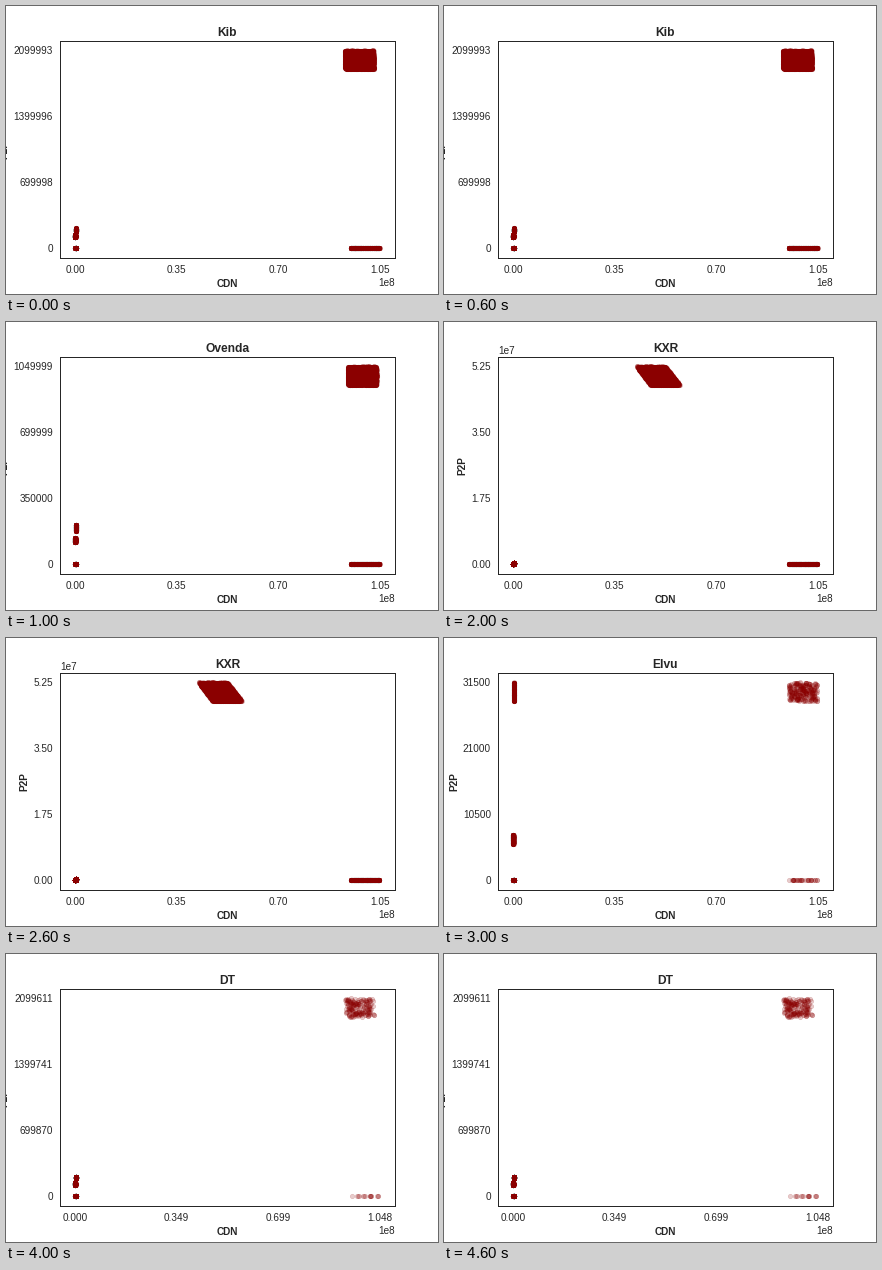
These frames come from a looping animation (432x288 px, 5 s). A matplotlib script:

```python
import numpy as np
import matplotlib.pyplot as plt
from matplotlib.animation import FuncAnimation
from matplotlib.ticker import FixedFormatter, FixedLocator

INK = "0.15"
RED = "#8b0000"

plt.rcParams.update({
    "font.family": "Liberation Sans",
    "font.size": 10,
    "text.color": INK,
    "axes.labelcolor": INK,
    "axes.edgecolor": INK,
    "axes.linewidth": 1,
    "xtick.color": INK,
    "ytick.color": INK,
    "xtick.major.size": 0,
    "ytick.major.size": 0,
    "xtick.major.pad": 7,
    "ytick.major.pad": 7,
})

# title, x max, x decimals, y max, y decimals, y exponent, P2P load,
# cluster size, baseline size, low-traffic bands (low, high, x spread)
SMALL = [(1.15e5, 1.4e5, 1e5), (1.75e5, 2.1e5, 4e5)]
SCENES = [
    ("Kib", 1.05e8, 2, 2099993.4, 0, 0, 2.0e6, 4000, 700, SMALL),
    ("Ovenda", 1.05e8, 2, 1049999, 0, 0, 1.0e6, 4000, 700, SMALL),
    ("KXR", 1.05e8, 2, 5.25e7, 2, 7, 5.0e7, 4000, 700, SMALL),
    ("Elvu", 1.05e8, 2, 31500, 0, 0, 3.0e4, 250, 32,
     [(5750, 7250, 1e5), (28500, 31500, 4e5)]),
    ("DT", 1.048e8, 3, 2099611, 0, 0, 2.0e6, 170, 15,
     [(1.17e5, 1.45e5, 1e5), (1.88e5, 2.05e5, 3e5)]),
]


def sample(i):
    """Points of one strategy: main cluster, baseline and low traffic."""
    rng = np.random.default_rng(40 + i)
    _, x_max, _, _, _, _, load, n_top, n_base, bands = SCENES[i]
    p2p = load * rng.uniform(0.95, 1.05, n_top)
    total = rng.uniform(0.95e8, x_max, n_top)
    shift = p2p if load > 1e5 else 0
    xs = [total - shift, rng.uniform(0.95e8, x_max, n_base),
          rng.uniform(0, 3e5, 150)]
    ys = [p2p, np.zeros(n_base), np.zeros(150)]
    for low, high, spread in bands:
        xs.append(rng.uniform(0.5, 1, 250) * spread)
        ys.append(rng.uniform(low, high, 250))
    return np.concatenate(xs), np.concatenate(ys)


def set_scale(axis, top, decimals, exponent):
    ticks = np.linspace(0, top, 4)
    labels = [f"{t / 10 ** exponent:.{decimals}f}" for t in ticks]
    if exponent == 0:
        labels[-1] = str(int(top))
    labels[0] = f"{0:.{decimals}f}"
    fmt = FixedFormatter(labels)
    fmt.set_offset_string(f"1e{exponent}" if exponent else "")
    axis.set_major_locator(FixedLocator(ticks))
    axis.set_major_formatter(fmt)


points = [sample(i) for i in range(len(SCENES))]

fig = plt.figure(figsize=(6, 4), dpi=72, facecolor="white")
ax = fig.add_axes([0.125, 0.125, 0.775, 0.755])


def draw(i):
    title, x_max, x_dec, y_max, y_dec, y_exp = SCENES[i][:6]
    ax.clear()
    ax.scatter(*points[i], s=20, color=RED, alpha=0.2, linewidths=0.6)
    ax.set_xlim(-0.05 * x_max, 1.05 * x_max)
    ax.set_ylim(-0.05 * y_max, 1.05 * y_max)
    set_scale(ax.xaxis, x_max, x_dec, 8)
    set_scale(ax.yaxis, y_max, y_dec, y_exp)
    ax.set_title(title, fontsize=12, fontweight="bold", y=1.0, pad=5)
    ax.set_xlabel("CDN", fontweight="bold", labelpad=4)
    ax.set_ylabel("P2P", fontweight="bold", labelpad=4)
    return []


anim = FuncAnimation(fig, draw, frames=len(SCENES), interval=1000,
                     init_func=lambda: [], repeat=True, repeat_delay=0)
plt.show()
```
